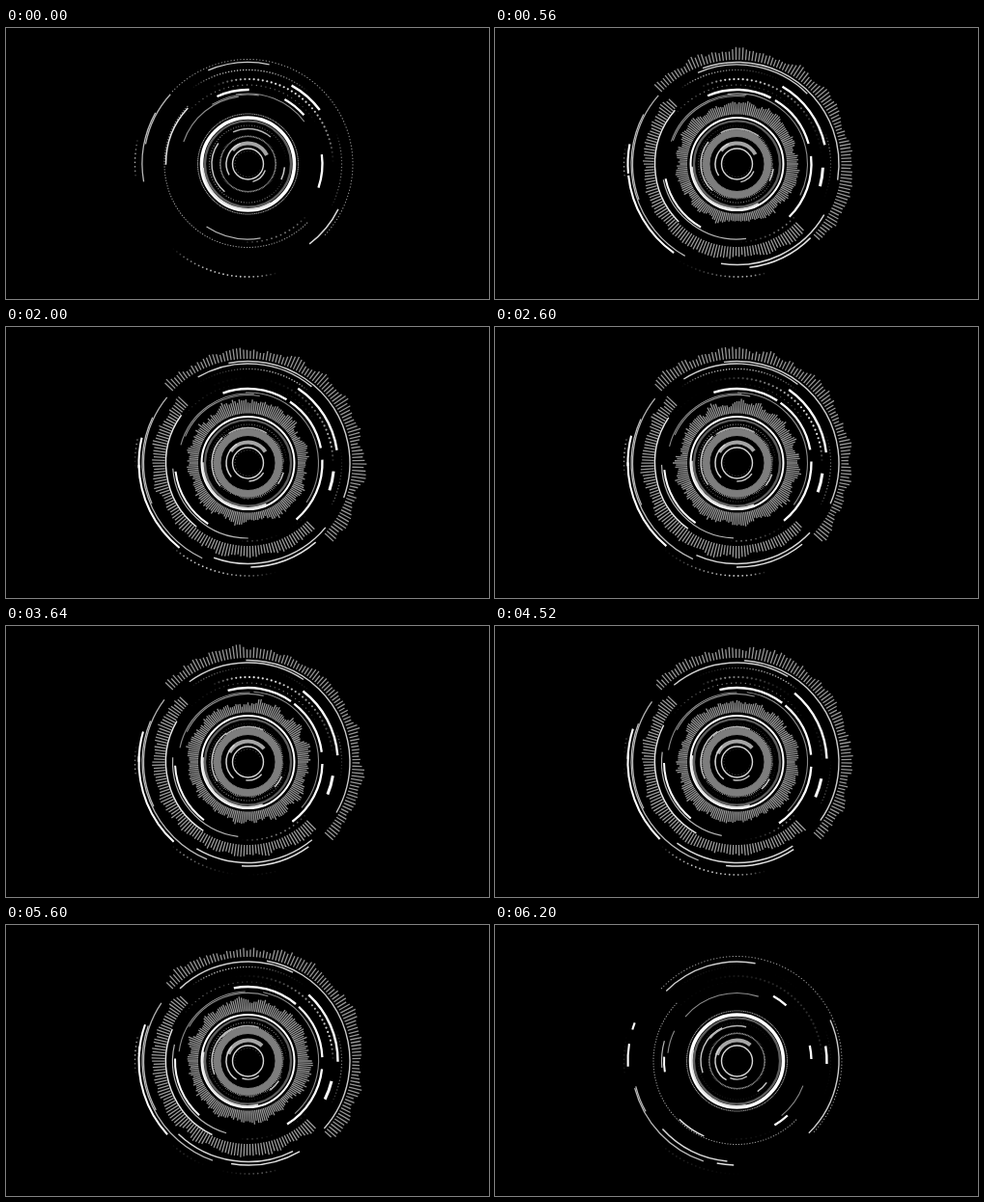
An HTML page with a canvas for the animation above (6.24 s loop, 500x281 px).

```html
<!DOCTYPE html>
<html>
<head>
<meta charset="utf-8">
<style>
html, body { margin: 0; width: 100%; height: 100%; overflow: hidden; background: #000; }
canvas { display: block; }
</style>
</head>
<body>
<canvas width="500" height="281"></canvas>
<script>
const ctx = document.querySelector('canvas').getContext('2d');
const LOOP = 6240, STEP = 40, RAD = Math.PI / 180;

const clamp = x => Math.max(0, Math.min(1, x));
const easeOut = x => 1 - (1 - clamp(x)) ** 3;
const gray = (v, a = 1) => `rgba(${v},${v},${v},${a})`;
const hash = (i, k) => {
  const s = Math.sin(i * 127.1 + k * 311.7) * 43758.5453;
  return s - Math.floor(s);
};
// value noise along x, one track per seed
function noise(seed, x) {
  const k = Math.floor(x), f = x - k, s = f * f * (3 - 2 * f);
  return hash(seed, k) * (1 - s) + hash(seed, k + 1) * s;
}

// how far the spectra are open, 0 to 1
const openness = t => easeOut(t / .45) * (1 - clamp((t - 5.75) / .4) ** 2);

function arc(r, width, from, to, color) {
  ctx.beginPath();
  ctx.arc(0, 0, r, Math.min(from, to) * RAD, Math.max(from, to) * RAD);
  ctx.lineWidth = width;
  ctx.strokeStyle = color;
  ctx.stroke();
}

// r: radius, w: width, a: origin angle, v: degrees per second, len: signed sweep,
// h: share drawn at the start, out: share erased from the origin at the end
const strokes = [
  { r: 77, w: 2.4, a: 245.4, v: 2.43, len: 51 },
  { r: 77, w: 2.3, a: -60.5, v: 2.43, len: 44, h: .44 },
  { r: 77, w: 2.3, a: -7.4, v: 2.43, len: 52 },
  { r: 75.5, w: 2, a: 118.3, v: 2.43, len: 50, h: 0 },
  { r: 78, w: 1.2, a: 80.4, v: 4.7, len: 86, c: 180 },
  { r: 85, w: 1.5, a: 223, v: -3.6, len: -87, c: 230 },
  { r: 72, w: 1.1, a: 279, v: -2, len: -80, c: 140 },
  { r: 73, w: 1.1, a: 260, v: 4, len: 126, c: 140 },
  { r: 70.5, w: 1.1, a: 199, v: 2, len: 77, c: 140, h: .82, out: .12 },
  { r: 93, w: 2.4, a: -61, v: 2.4, len: 48 },
  { r: 89, w: 3, a: 1.2, v: 2.2, len: 13, h: 0, out: 1 },
  { r: 103, w: 1.4, a: 317, v: -3.6, len: -70, c: 205, h: 0, out: .2 },
  { r: 105.5, w: 1.4, a: 247, v: 6, len: 121, c: 205, h: .29, out: .43 },
  { r: 108, w: 1.3, a: 222, v: -1.45, len: -62, c: 180 },
  { r: 113, w: 2.1, a: 124, v: 2.43, len: 50, h: 0 },
  { r: 113, w: 2.1, a: 174, v: 1.7, len: 16, h: 0 },
  { r: 109.5, w: 1.3, a: 209, v: -1.7, len: -90, c: 185, h: .43, out: .37 },
  { r: 104.5, w: 1.5, a: 26.6, v: 6.6, len: 70, c: 215, h: .37, out: .4 },
  { r: 108, w: 1.5, a: 43.5, v: 3, len: 39, c: 225, h: 0 }
];

function drawStroke({ r, w, a, v, len, c = 255, h = .5, out = .76 }, t) {
  const head = h + (1 - h) * easeOut(t / .8);
  const tail = out * clamp((t - 5.6) / .6) ** 1.5;
  const start = a + v * t;
  if (head > tail) arc(r, w, start + tail * len, start + head * len, gray(c));
}

// radial bars: a common floor, a rolling swell and a little jitter
function spectrum(r, from, to, step, low, high, width, color, t, seed) {
  const amp = openness(t);
  ctx.strokeStyle = color;
  ctx.lineWidth = width;
  ctx.beginPath();
  for (let a = from, i = 0; a < to; a += step, i++) {
    const swell = noise(seed + Math.floor(t * 5), i * .22);
    const next = noise(seed + Math.floor(t * 5) + 1, i * .22);
    const mix = swell + (next - swell) * (t * 5 % 1);
    const h = low + (high - low) * (.65 * mix + .35 * noise(seed + 50 + i, t * 8));
    const x = Math.cos(a * RAD), y = Math.sin(a * RAD), end = r + 1 + h * amp;
    ctx.moveTo(x * r, y * r);
    ctx.lineTo(x * end, y * end);
  }
  ctx.stroke();
}

// dots whose brightness sweeps along the row
function dots(r, from, to, step, size, bright, speed, t) {
  const fade = 1 - .8 * clamp((t - 5.7) / .5);
  for (let a = from; a < to; a += step) {
    const p = (a - from) / (to - from);
    const glow = .5 + .5 * Math.sin(p * 3.6 + t * speed);
    ctx.fillStyle = gray(255, bright * fade * glow * Math.min(1, p * 6, (1 - p) * 8));
    ctx.beginPath();
    ctx.arc(r * Math.cos(a * RAD), r * Math.sin(a * RAD), size, 0, 7);
    ctx.fill();
  }
}

function drawCore(t) {
  const open = openness(t);
  arc(48, 3.6 - 1.6 * open, 0, 360, '#fff');
  arc(44.5, 2.2, 0, 360, gray(95));
  arc(46.8, 2, 60 + 3 * t, 175 + 3 * t, gray(225));
  arc(37.5, 1.4, 130 + 5 * t, 215 + 5 * t, gray(200));
  arc(36.5, 1.5, 245 - 4 * t, 310 - 4 * t, gray(180));
  arc(38, 1.5, 5 + 5 * t, 25 + 5 * t, gray(200));
  dots(40, 0, 360, 4, .6, .6, 2, t);
  arc(28.5, 1, 0, 360, gray(120));
  arc(28.5 + 3.5 * open, 1 + 6 * open, 0, 360, gray(125, open));
  arc(21.5, 4, 222 - 4 * t, 335 - 4 * t, gray(165));
  arc(22.5, 1.5, 150 - 5 * t, 250 - 5 * t, gray(210));
  arc(19, 1.4, 20 + 6 * t, 75 + 6 * t, gray(200));
  arc(16, 1.4, 0, 360, gray(215));
  dots(13.5, 0, 360, 14, .5, .4, 3, t);
}

function draw(now) {
  const t = Math.floor(now % LOOP / STEP) * STEP / 1000;
  ctx.setTransform(1, 0, 0, 1, 0, 0);
  ctx.fillStyle = '#000';
  ctx.fillRect(0, 0, 500, 281);
  ctx.translate(250.5, 141);

  spectrum(108, 224, 403, 1.75, 4, 15, 1.3, gray(150), t, 100);
  spectrum(86, 45, 224, 1.9, 6, 15, 1.3, gray(155), t, 400);
  spectrum(51.5, 0, 360, 2, 4, 16, 1.3, gray(150), t, 700);
  spectrum(28.5, 0, 360, 3, 6, 9, 1, gray(150), t, 1000);

  dots(117, 74, 132, 2.2, .9, .8, 2.7, t);
  dots(117, 172, 194, 2.2, .8, .7, 2.1, t);
  dots(97.5, 233, 311, 1.8, .8, .75, 2.4, t);
  dots(88, 244, 360, 3, 1.1, .9, 1.9, t);
  dots(97, -20, 28, 2, .7, .5, 2.2, t);
  dots(82, 215, 330, 3.4, .7, .5, 1.4, t);
  dots(81, 40, 95, 3.6, .9, .5, 1.7, t);

  strokes.forEach(s => drawStroke(s, t));
  drawCore(t);
}

const began = performance.now();
function tick() {
  draw(performance.now() - began);
  requestAnimationFrame(tick);
}
tick();
</script>
</body>
</html>
```
